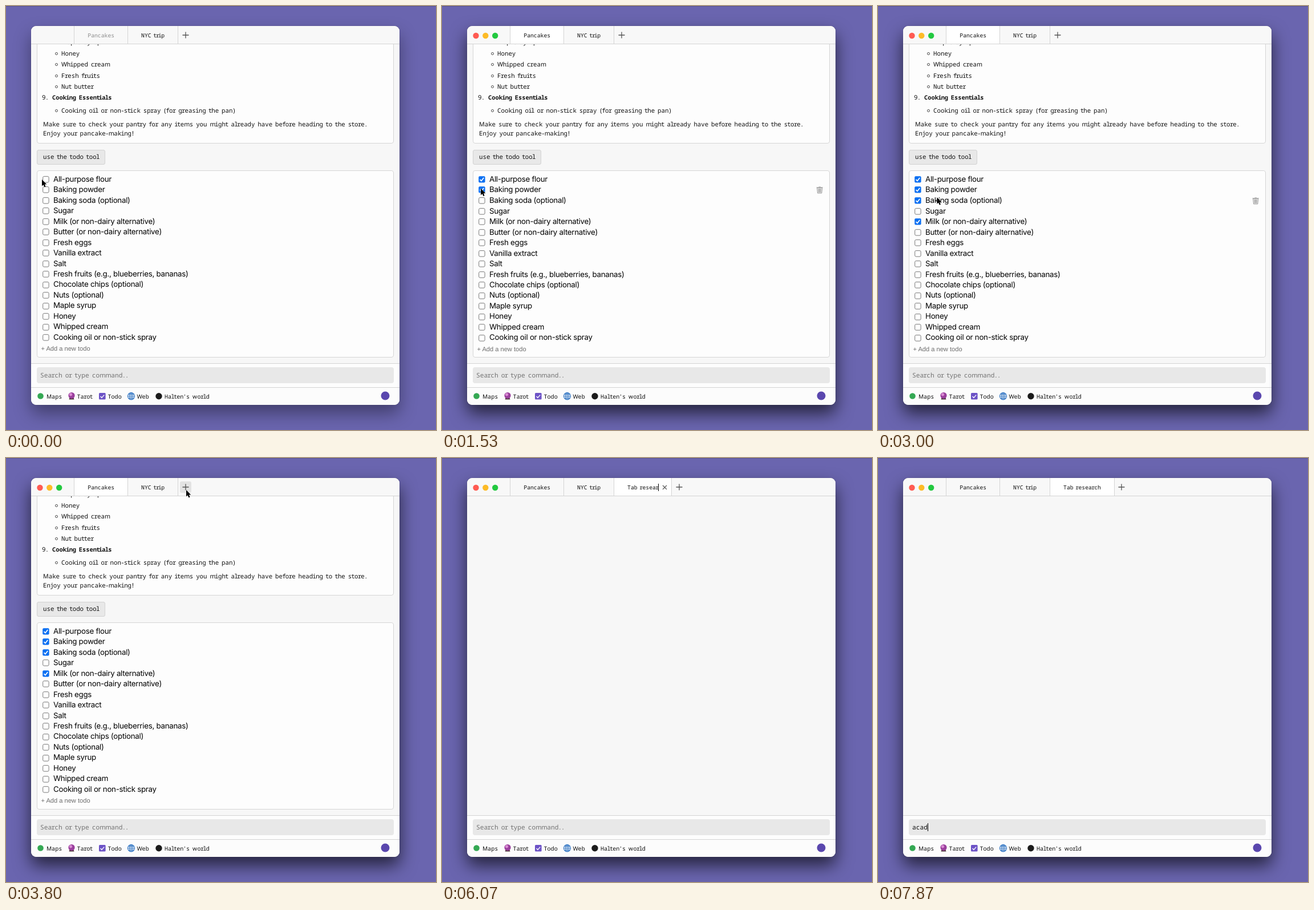
An HTML page that plays this animation: 754 by 743 pixels, repeating every 8 s.

```html
<!DOCTYPE html>
<html lang="en">
<head>
<meta charset="utf-8">
<title>Workspaces</title>
<style>
  html, body { margin: 0; width: 100%; height: 100%; overflow: hidden; }
  body {
    position: relative; background: #6a65af; color: #111;
    font-family: "Noto Sans Mono", monospace; font-weight: 500; text-rendering: geometricPrecision;
  }
  div, svg { position: absolute; box-sizing: border-box; }
  .sky { left: 0; top: 0; width: 100%; height: 1px; background: #57538f; }
  .window {
    left: 44px; top: 35px; width: 646px; height: 664px; border-radius: 9px; background: #f7f7f7;
    box-shadow: 0 0 1px rgba(0, 0, 0, .6), 0 15px 30px rgba(0, 0, 0, var(--shade));
  }
  .card { left: 54px; width: 626px; background: #fdfdfd; border: 1px solid #d6d6d6; border-radius: 4px; }
  .line { line-height: 20px; white-space: pre; }
  .line.bold { font-weight: 700; }

  /* Quattro-style spacing: slim letters take 3/4 of a cell, broad ones 3/2 */
  i { font-style: normal; letter-spacing: -.15em; position: relative; left: -.075em; }
  b { display: inline-block; width: .9em; text-align: center; font-family: "Noto Sans", sans-serif; font-weight: inherit; }
  s { display: inline-block; width: 1px; height: 13px; margin-right: -1px; background: #000; vertical-align: -3px; }
  mark { color: inherit; background: #b2d4fc; }

  .bullet { left: 86px; width: 5px; height: 5px; border: 1px solid #444; border-radius: 50%; }
  .button { left: 54px; top: 252px; width: 120px; height: 26px; background: #e8e8e8; border: 1px solid #d2d2d2; border-radius: 3px; }

  .todos { top: 288px; padding: 5.8px 0 1.5px; }
  .todos div { position: relative; }
  .row { height: 18.48px; padding-left: 28px; font: 400 13.33px/18.48px Inter, sans-serif; letter-spacing: -.021em; color: #000; }
  .row.hover { height: 18.98px; }
  .row svg { left: 9px; top: 3.2px; }
  .row svg.trash { left: 601px; top: 3px; display: none; }
  .row.hover svg.trash { display: block; }
  .row .tick, .row.done .empty { display: none; }
  .row.done .tick { display: inline; }
  .add { height: 23px; padding-left: 6.5px; font: 400 11.1px/23px "Liberation Sans", Arial, sans-serif; color: #6c6c6c; }

  .bar { left: 44px; top: 35px; width: 646px; height: 32px; background: #f8f8f8; border-bottom: 1px solid #d4d4d4; border-radius: 9px 9px 0 0; }
  #lights { left: 0; top: 0; }
  .tabs { left: 75.3px; top: 0; height: 31px; display: flex; font-size: 9.75px; line-height: 33px; white-space: pre; }
  .tabs div { position: relative; height: 31px; border-left: 1px solid #d4d4d4; }
  .tab { padding: 0 23px; }
  .tab.active { background: #fff; }
  .tab svg { right: 7px; top: 12px; }
  .plus { width: 26px; }
  .plus svg { left: 2.5px; top: 6px; border-radius: 3px; }
  .plus.hover svg { background: #e3e3e3; }

  .prompt { left: 44px; top: 626px; width: 646px; height: 42px; background: #fdfdfd; border-top: 1px solid #d4d4d4; }
  .input { left: 54px; top: 633px; width: 626px; height: 28px; background: #e8e8e8; border-radius: 4px; }
  .footer { left: 44px; top: 668px; width: 646px; height: 31px; background: #fcfcfc; border-top: 1px solid #d4d4d4; border-radius: 0 0 9px 9px; }
  #query s { height: 14px; }
  .icons { left: 0; top: 0; }
  .pointer { left: 0; top: 0; overflow: visible; }
</style>
</head>
<body>
<div class="sky"></div>
<div class="window" id="window"></div>

<div id="content">
  <div class="card" style="top:60px;height:181px"></div>
  <div class="button"></div>
  <div class="card todos" id="todos"></div>
</div>

<div class="bar">
  <svg id="lights" width="60" height="30">
    <circle cx="15.5" cy="17" r="5.2" fill="#ff5b52"/>
    <circle cx="32.3" cy="17" r="5.2" fill="#fdbb27"/>
    <circle cx="49.2" cy="17" r="5.2" fill="#23c940"/>
  </svg>
  <div class="tabs">
    <div class="tab" id="pancakes"></div>
    <div class="tab" id="trip"></div>
    <div class="tab active" id="fresh"><span id="label"></span><svg id="close" width="9" height="9" stroke="#555" stroke-width="1.1"><path d="M1 1L8 8M8 1L1 8"/></svg></div>
    <div class="plus" id="plus"><svg width="20" height="20" stroke="#555" stroke-width="1.3"><path d="M4.5 10H15.5M10 4.5V15.5"/></svg></div>
  </div>
</div>

<div class="prompt"></div>
<div class="input"></div>
<div class="footer"></div>
<div class="line" id="query" style="left:60px;top:638px;font-size:11.2px"></div>
<svg class="icons" width="754" height="743">
  <circle cx="60.5" cy="683.5" r="5.3" fill="#34a853"/>
  <path d="M110.5 689.5L112 685H118L119.5 689.5Z" fill="#4a3038"/>
  <circle cx="115" cy="682.5" r="5.6" fill="#9a3f9d"/>
  <circle cx="113.5" cy="680.8" r="2.6" fill="#d98bd3"/>
  <rect x="163" y="678" width="11.6" height="11.6" rx="1.5" fill="#6c52c6"/>
  <path d="M165.6 684l2.3 2.4 4.3-4.8" fill="none" stroke="#fff" stroke-width="1.4"/>
  <g fill="none" stroke="#3477c4" stroke-width="1.1">
    <circle cx="219.5" cy="683.7" r="6.1"/>
    <ellipse cx="219.5" cy="683.7" rx="2.9" ry="6.1"/>
    <path d="M213.4 683.7H225.6M219.5 677.6V689.8M214.4 680.4H224.6M214.4 687H224.6"/>
  </g>
  <circle cx="268" cy="683.7" r="5.7" fill="#1b1b1b"/>
  <circle cx="665" cy="683" r="7.5" fill="#5a47ae"/>
</svg>

<svg class="pointer" width="1" height="1">
  <path id="arrow" d="M0 0V11.6L2.6 9.2L4.5 13.4L6.6 12.5L4.8 8.4H8.3Z" fill="#000" stroke="#fff" stroke-width=".9" paint-order="stroke"/>
  <path id="beam" d="M-3.2-6.5Q0-6.5 0-4.5Q0-6.5 3.2-6.5M0-4.5V5M-3.2 7Q0 7 0 5Q0 7 3.2 7M-1.8 2H1.8" fill="none" stroke="#111" stroke-width="1.1"/>
</svg>

<script>
const LOOP = 8000;
const $ = id => document.getElementById(id);
const content = $('content');

const spaced = text => text.replace(/[ fijlrtI.,'()!-]+|[mwMW]/g,
  part => /[mwMW]/.test(part) ? `<b>${part}</b>` : `<i>${part}</i>`);

function line(parent, x, middle, size, text, look = '') {
  parent.insertAdjacentHTML('beforeend',
    `<div class="line ${look}" style="left:${x}px;top:${middle - 10}px;font-size:${size}px">${spaced(text)}</div>`);
}
function bullet(middle, text) {
  content.insertAdjacentHTML('beforeend', `<div class="bullet" style="top:${Math.round(middle - 3)}px"></div>`);
  line(content, 97, middle, 10.78, text);
}

['Maple syrup', 'Honey', 'Whipped cream', 'Fresh fruits', 'Nut butter']
  .forEach((text, k) => bullet(64.4 + 19.4 * k, text));
line(content, 63, 161, 10.78, '9.');
line(content, 81, 161, 10.4, 'Cooking Essentials', 'bold');
bullet(184, 'Cooking oil or non-stick spray (for greasing the pan)');
line(content, 65, 207.5, 10.78, 'Make sure to check your pantry for any items you might already have before heading to the store.');
line(content, 65, 223.5, 10.78, 'Enjoy your pancake-making!');
line(content, 65, 265, 10.78, 'use the todo tool');

[[71, 'Maps'], [124.5, 'Tarot'], [178.5, 'Todo'], [229.5, 'Web'], [278, "Halten's world"]]
  .forEach(([x, text]) => line(document.body, x, 684, 10.1, text));
document.body.append(document.querySelector('.pointer'));

const items = ['All-purpose flour', 'Baking powder', 'Baking soda (optional)', 'Sugar',
  'Milk (or non-dairy alternative)', 'Butter (or non-dairy alternative)', 'Fresh eggs',
  'Vanilla extract', 'Salt', 'Fresh fruits (e.g., blueberries, bananas)',
  'Chocolate chips (optional)', 'Nuts (optional)', 'Maple syrup', 'Honey', 'Whipped cream',
  'Cooking oil or non-stick spray'];
$('todos').innerHTML = items.map(item => `<div class="row">${item}
  <svg width="12" height="12"><rect class="empty" x=".7" y=".7" width="10.4" height="10.4" rx="2" fill="#fff" stroke="#777"/>
  <g class="tick"><rect x=".2" y=".2" width="11.4" height="11.4" rx="2" fill="#0c70f2"/><path d="M2.6 6.1l2.4 2.4 4.2-5.4" fill="none" stroke="#fff" stroke-width="1.7"/></g></svg>
  <svg class="trash" width="13" height="13" fill="#e2e2e2" stroke="#8c8c8c" stroke-width=".8"><path d="M1.6 2.5L2.6 12H9.8L10.8 2.5ZM.6 2H11.8M4.5 1H8M4.6 4V10.5M6.2 4V10.5M7.8 4V10.5"/></svg></div>`)
  .join('') + '<div class="add">+ Add a new todo</div>';
const rows = [...document.querySelectorAll('.row')];

$('pancakes').innerHTML = spaced('Pancakes');
$('trip').innerHTML = spaced('NYC trip');

const FOCUS = 330, CREATE = 3870, SELECT = 4530, TYPE = 5000, ENTER = 6600, SEARCH = 7070;
const checkedAt = { 0: 930, 1: 1470, 2: 1870, 4: 2530 };
const titleKeys = [5000, 5130, 5270, 5400, 5530, 5600, 5730, 5800, 5930, 6070, 6200, 6330];
const queryKeys = [7200, 7530, 7670, 7870];
const path = [[0, 63, 304], [480, 67, 301], [1210, 67, 302], [1340, 68, 319], [1600, 68, 320],
  [1780, 69, 338], [2000, 69, 340], [2300, 70, 379], [2800, 70, 379], [3670, 316, 56],
  [4010, 316, 56], [4270, 357, 48], [LOOP, 357, 48]];

const typed = (text, keys, t) => text.slice(0, keys.filter(k => t >= k).length);
const clamp = v => Math.min(1, Math.max(0, v));
const show = (el, on) => { el.style.display = on ? '' : 'none'; };
function write(el, html) {
  if (el.written !== html) el.innerHTML = el.written = html;
}

function pointerAt(t) {
  const k = path.findIndex(p => p[0] > t);
  const [t0, x0, y0] = path[k - 1], [t1, x1, y1] = path[k];
  const p = (t - t0) / (t1 - t0), e = p * p * (3 - 2 * p);
  return [x0 + (x1 - x0) * e, y0 + (y1 - y0) * e];
}

function titleHtml(t) {
  if (t < SELECT) return spaced('New workspace');
  if (t < TYPE) return `<mark>${spaced('New workspace')}</mark>`;
  return spaced(typed('Tab research', titleKeys, t)) + (t < ENTER ? '<s></s>' : '');
}

function queryHtml(t) {
  const caret = t >= SEARCH ? '<s></s>' : '';
  const text = typed('acad', queryKeys, t);
  return text ? spaced(text) + caret
    : caret + `<span style="color:#747474">${spaced('Search or type command..')}</span>`;
}

function render(now) {
  const t = now % LOOP;
  const [x, y] = pointerAt(t);
  const focused = t >= FOCUS, created = t >= CREATE;

  $('window').style.setProperty('--shade', .38 + .27 * clamp((t - FOCUS) / 150));
  show($('lights'), focused);
  $('pancakes').style.color = focused ? '' : '#8c8c8c';
  $('pancakes').classList.toggle('active', focused && !created);

  show(content, !created);
  const hovered = focused && y < 590 ? Math.floor((y - 294.3) / 18.48) : -1;
  rows.forEach((row, k) => {
    row.classList.toggle('hover', k === hovered);
    row.classList.toggle('done', t >= checkedAt[k]);
  });

  show($('fresh'), created);
  show($('close'), t < ENTER);
  write($('label'), titleHtml(t));
  $('plus').classList.toggle('hover', !created && x > 305 && x < 325 && y > 41 && y < 61);
  write($('query'), queryHtml(t));

  const beam = created && x > 326;
  show($('arrow'), !beam);
  show($('beam'), beam && t < TYPE);
  for (const id of ['arrow', 'beam']) $(id).setAttribute('transform', `translate(${x} ${y})`);
}

function tick(now) {
  render(now);
  requestAnimationFrame(tick);
}
render(0);
requestAnimationFrame(tick);
</script>
</body>
</html>
```
